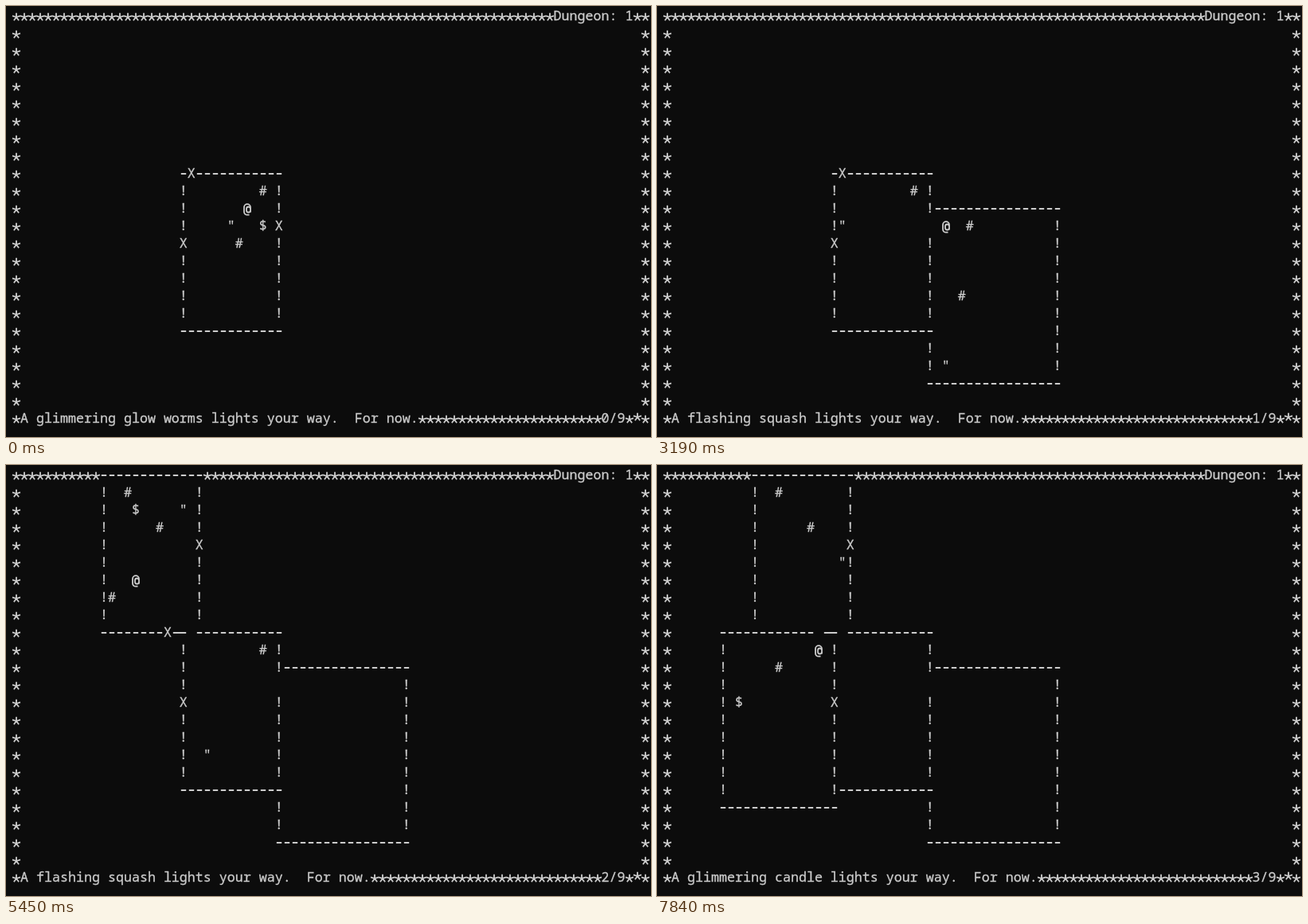
Animation, 810 px wide and 542 px high, one loop 8000 ms. Source, as an HTML page:

```html
<!DOCTYPE html>
<html lang="en">
<head>
<meta charset="utf-8">
<title>Dungeon</title>
<style>
  html, body { margin: 0; width: 100%; height: 100%; overflow: hidden; background: #0c0c0c; }
  svg { display: block; }
  text {
    font: 500 16.667px "Noto Sans Mono", "DejaVu Sans Mono", monospace;
    fill: #ccc; stroke: #ccc; stroke-width: .3; white-space: pre;
  }
  path { fill: none; stroke: #ccc; stroke-width: 1.8; }
</style>
</head>
<body>
<svg width="810" height="542" viewBox="0 0 810 542"><path id="marks"/></svg>
<script>
const LOOP = 8000, COLS = 80, ROWS = 24;
const centerX = c => 13 + 10 * c;
const centerY = r => 13 + 22 * r;

const spread = (start, end, n) =>
  Array.from({ length: n }, (_, i) => start + (end - start) * i / (n - 1));

// Moments at which a turn is played.
const TURNS = [
  550, 730, 810, 1010, 1060, 1140, 1240,
  ...spread(1670, 2080, 6), ...spread(2230, 2460, 3), 2610, 2810,
  3060, 3120, 3190, 3290, 3370, ...spread(3550, 4210, 11),
  ...spread(4360, 4540, 3), 4720, ...spread(4970, 5700, 9), 5850,
  6080, 6180, 6260, 6330, 6390, ...spread(6540, 7050, 7),
  ...spread(7200, 7480, 4), 7760, 7840
];

// One letter per turn; lower case moves two cells, a dot waits.
const walker = (char, col, row, from, to, path) =>
  ({ char, col, row, from, to, path: path.replace(/ /g, "") });
const WALKERS = [
  walker('"', 27, 12, 0, 65,
    "L LL LLRL RLRLRL UUR L D UDDDD DURLDURRLRD LRD . RLDURLLRD L UDLRL RULRUDR LRLR ."),
  walker('"', 35, 15, 13, 34, "DDD D D ...LR LRLRLRLRLRL"),
  walker('"', 20, 1, 34, 99, "RRL L RLDURDRUD D LRDLR LRDUDLR DUDU UD"),
  walker("@", 29, 11, 0, 99,
    "D RR DLLL URRRRR RRR D D UULLL LlLLlLLLLuU UUU L LLLLLLUUU U DDDDD LLLRRRD RRRR DD")
];
const DIRS = { L: [-1, 0], R: [1, 0], U: [0, -1], D: [0, 1], ".": [0, 0] };

// left, top, right, bottom, first turn; later rooms cover earlier ones
const ROOMS = [
  [11, 0, 23, 9, 34],
  [33, 11, 49, 21, 13],
  [21, 9, 33, 18, 0],
  [7, 9, 21, 19, 65]
];

// col, row, first turn, turn at which it opens
const DOORS = [
  [22, 9, 0, 34], [33, 12, 0, 13], [21, 13, 0, 99],
  [23, 4, 34, 99], [19, 9, 34, 65]
];

// char, col, row, first turn, turn at which it disappears
const ITEMS = [
  ["#", 31, 10, 0, 66], ["$", 31, 12, 0, 3], ["#", 28, 13, 0, 7],
  ["#", 38, 12, 13, 35], ["#", 37, 16, 13, 35],
  ["#", 14, 1, 34, 99], ["$", 15, 2, 34, 48], ["#", 18, 3, 34, 99],
  ["#", 12, 7, 34, 56], ["$", 21, 6, 34, 38],
  ["#", 14, 11, 65, 99], ["$", 9, 13, 65, 99]
];

const light = name => `A ${name} lights your way.  For now.`;
const pick = name => `You pick up a ${name}.`;
const MESSAGES = [
  [0, light("glimmering glow worms")], [3, pick("plain jewel")],
  [6, light("glimmering glow worms")], [7, light("flashing squash")],
  [38, pick("bejewled egg")], [41, light("flashing squash")],
  [48, pick("illustrated egg")], [51, light("flashing squash")],
  [56, light("glimmering candle")]
];
const PICKUPS = [3, 38, 48];

function locate(w, turn) {
  let { col, row } = w;
  for (const step of w.path.slice(0, turn - w.from)) {
    const [dx, dy] = DIRS[step.toUpperCase()];
    const n = step === step.toUpperCase() ? 1 : 2;
    col += dx * n;
    row += dy * n;
  }
  return [col, row];
}

function buildGrid(turn) {
  const grid = Array.from({ length: ROWS }, () => Array(COLS).fill(" "));
  const put = (col, row, text) => [...text].forEach((ch, i) => grid[row][col + i] = ch);
  const frame = (left, top, right, bottom, across, down) => {
    for (let r = top + 1; r < bottom; r++) {
      put(left, r, down);
      put(right, r, down);
    }
    for (const r of [top, bottom]) put(left, r, across.repeat(right - left + 1));
  };

  frame(0, 0, COLS - 1, ROWS - 1, "*", "*");
  for (const [l, t, r, b, from] of ROOMS) if (turn >= from) frame(l, t, r, b, "-", "!");
  for (const [c, r, from, open] of DOORS) if (turn >= from) put(c, r, turn < open ? "X" : " ");
  for (const [ch, c, r, from, to] of ITEMS) if (turn >= from && turn < to) put(c, r, ch);
  for (const w of WALKERS) {
    if (turn >= w.from && turn <= w.to) put(...locate(w, turn), w.char);
  }
  put(68, 0, "Dungeon: 1");
  put(1, 23, MESSAGES.filter(m => m[0] <= turn).pop()[1]);
  put(74, 23, PICKUPS.filter(t => t <= turn).length + "/9");
  return grid.map(cells => cells.join(""));
}

const STAR = [-90, -18, 54, 126, 198].map(deg => {
  const a = deg * Math.PI / 180;
  return [5.3 * Math.cos(a), 5.3 * Math.sin(a)];
});

const star = (x, y) => STAR.map(([dx, dy]) =>
  `M${x} ${y}l${dx.toFixed(2)} ${dy.toFixed(2)}`).join("");

// Tall "at" sign that reaches below the baseline.
const hero = (x, y) =>
  `M${x + 2.5} ${y + 7.7}h-2.5a4 4 0 0 1 -4 -4v-5.5a4 4 0 0 1 8 0v6.2` +
  `m0 -4.4a2.5 2.5 0 0 0 -5 0v2a2.5 2.5 0 0 0 5 0`;

// Exactly two dashes join; the middle of exactly three stars is raised.
function rowMarks(line, r) {
  let d = "";
  for (const { 0: run, index } of line.matchAll(/\*+|-+|@/g)) {
    for (let i = 0; i < run.length; i++) {
      const x = centerX(index + i), y = centerY(r);
      if (run === "@") d += hero(x, y);
      else if (run[0] === "*") d += star(x, y + (run.length === 3 && i === 1 ? -2 : 1));
      else if (run.length !== 2) d += `M${x - 3.2} ${y}h6.4`;
      else if (i === 0) d += `M${x - 3.2} ${y}h16.4`;
    }
  }
  return d;
}

const svg = document.querySelector("svg");
const marks = document.getElementById("marks");
const lines = Array.from({ length: ROWS }, (_, r) => {
  const el = document.createElementNS("http://www.w3.org/2000/svg", "text");
  el.setAttribute("x", 8);
  el.setAttribute("y", centerY(r) + 5);
  return svg.appendChild(el);
});

let shown = -1;
function render(time) {
  const turn = TURNS.filter(t => t <= time + 0.01).length;
  if (turn === shown) return;
  shown = turn;
  const grid = buildGrid(turn);
  marks.setAttribute("d", grid.map(rowMarks).join(""));
  grid.forEach((line, r) => lines[r].textContent = line.replace(/[*@-]/g, " "));
}

const start = performance.now();
function tick() {
  render((performance.now() - start) % LOOP);
  requestAnimationFrame(tick);
}
tick();
</script>
</body>
</html>
```
